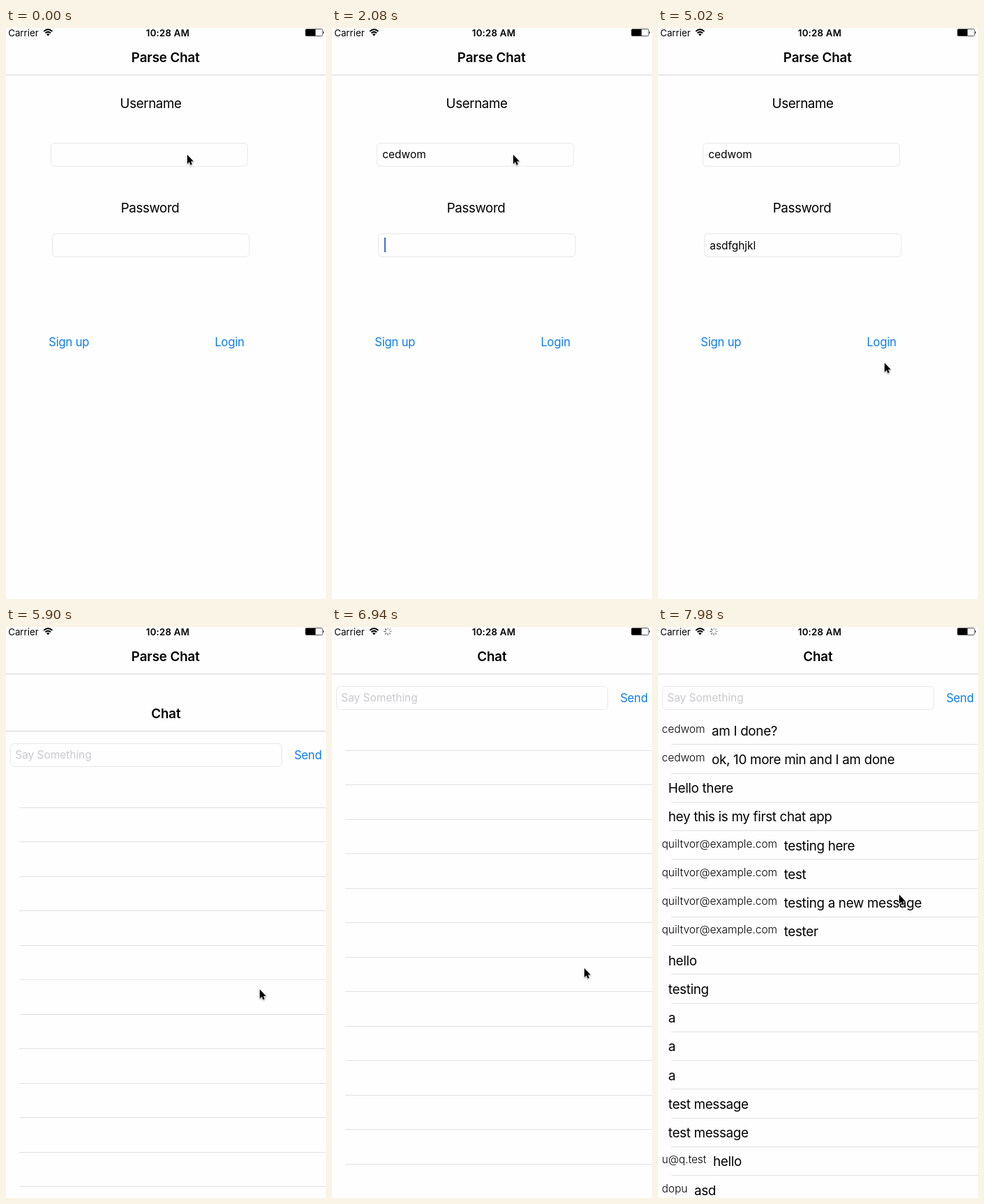
These frames come from a looping animation (459 by 820 pixels, 8 s). An HTML page:

```html
<!DOCTYPE html>
<html lang="en">
<head>
<meta charset="utf-8">
<title>Chat login</title>
<style>
  html, body { margin: 0; width: 100%; height: 100%; overflow: hidden; background: #fefefe; }
  svg { display: block; width: 459px; height: 820px; }
  text { font: 18.85px Inter, Roboto, sans-serif; letter-spacing: -.45px; white-space: pre; }
  #list text { letter-spacing: -.33px; }
  .title { font-weight: 600; letter-spacing: -.15px; }
  .field { font-size: 15.5px; letter-spacing: -.05px; }
  .hint { fill: #c9c9ce; }
  .link { font-size: 16.6px; letter-spacing: -.17px; fill: #0a7cf6; }
  .status { font-size: 13.3px; letter-spacing: 0; }
  .clock { font-weight: 600; letter-spacing: .2px; }
  .who { font-size: 15.5px; font-weight: 300; letter-spacing: 0; }
  .box { fill: #fefefe; stroke: #e8e8e8; }
  .rule { stroke: #d3d3d3; }
  .row { stroke: #e0e0e0; }
</style>
</head>
<body>
<svg viewBox="0 0 459 820">
  <rect width="459" height="820" fill="#fefefe"/>

  <g id="login">
    <text class="title" x="179.8" y="49">Parse Chat</text>
    <path class="rule" d="M0 67.5H459"/>
    <text x="163.6" y="115">Username</text>
    <rect class="box" x="64.5" y="165.5" width="282" height="33" rx="5"/>
    <text class="field" id="user" x="72.3" y="187"></text>
    <text x="164.7" y="264.7">Password</text>
    <rect class="box" x="66.5" y="295.5" width="282.5" height="33" rx="5"/>
    <text class="field" id="pass" x="74.3" y="317.5"></text>
    <rect id="caret" width="2" height="21" fill="#4468dd"/>
    <text class="link" x="61.2" y="457">Sign up</text>
    <text class="link" id="go" x="299.4" y="457">Login</text>
  </g>

  <g id="sheet">
    <rect width="459" height="820" fill="#fefefe"/>
    <text class="title" x="208.2" y="49">Chat</text>
    <path class="rule" d="M0 67.5H459"/>
    <rect class="box" x="6.5" y="85.5" width="389" height="33" rx="5"/>
    <text class="field hint" x="13.3" y="107.4">Say Something</text>
    <text class="link" x="413.4" y="108">Send</text>
    <g id="blank"></g>
    <g id="list"></g>
  </g>

  <g id="bar">
    <text class="status" x="3.2" y="11.5">Carrier</text>
    <text class="status clock" x="232" y="11.5" text-anchor="middle">10:28 AM</text>
    <g fill="none" stroke="#000" stroke-width="2">
      <path d="M54.2 4.9Q60.3 -.9 66.4 4.9M56.5 7.3Q60.3 3.9 64.1 7.3"/>
    </g>
    <path d="M58 8.9Q60.3 7 62.6 8.9L60.3 11.4Z"/>
    <rect x="429.5" y="1.5" width="24.5" height="10" rx="1.5" fill="#fefefe" stroke="#555"/>
    <path d="M430 2H444V11H430ZM455 4.5Q457 6.5 455 8.5Z"/>
    <g id="spin" transform="translate(80 6.5)" stroke="#000" stroke-width="1.2"></g>
  </g>

  <path id="mouse" d="M0 0V13L3 10.3L4.8 14.7L6.9 13.8L5.1 9.4H9Z" stroke="#fff" paint-order="stroke"
    style="filter:drop-shadow(0 1px 1px #0006)"/>
</svg>

<script>
const $ = id => document.getElementById(id);
const LOOP = 8000, STEP = 147.6;
const NAME = "cedwom", SECRET = "asdfghjkl", MAIL = "quiltvor@example.com";

const messages = [
  [NAME, "am I done?"], [NAME, "ok, 10 more min and I am done"],
  ["", "Hello there"], ["", "hey this is my first chat app"],
  [MAIL, "testing here"], [MAIL, "test"], [MAIL, "testing a new message"], [MAIL, "tester"],
  ["", "hello"], ["", "testing"], ["", "a"], ["", "a"], ["", "a"],
  ["", "test message"], ["", "test message"], ["u@q.test", "hello"], ["dopu", "asd"]
];

// [time, value] pairs: the value holds until the next time
const userTyped = [[0, 0], [590, 2], [890, 3], [1030, 4], [1180, 6]];
const passTyped = [[0, 0], [2830, 1], [2980, 2], [3120, 3], [3420, 4], [3560, 5],
  [3860, 6], [4010, 7], [4150, 8], [4300, 9]];
const caretAlpha = [[0, 0], [150, .5], [300, 1], [1780, 0], [1930, .5], [2080, 1],
  [2680, .5], [2830, 1], [4590, .5], [4740, 0], [5320, 1]];

// [step, x, y] of the pointer tip
const path = [[30, 260, 182], [34, 325, 481], [36, 327, 450], [38, 329, 452],
  [40, 364, 520.5], [43, 362.5, 495], [47, 362, 490], [50, 362, 490], [54, 346, 384.5]];

const line = y => `<path class="row" d="M19 ${Math.floor(y) + .5}H459"/>`;
$("blank").innerHTML = Array.from({ length: 13 }, (_, i) => line(177 + 49.5 * i)).join("");
$("list").innerHTML = messages.map(([who, text], i) => {
  const y = 41.26 * i;
  const label = who && `<tspan class="who">${who}</tspan>`;
  return `<text x="${who ? 5.5 : 14.8}" y="${151.5 + y}">${label}` +
    `<tspan dx="${who ? 9.5 : 0}" dy="4">${text}</tspan></text>` + line(168.75 + y);
}).join("");
$("spin").innerHTML = Array.from({ length: 8 }, (_, i) =>
  `<path d="M0 -2.6V-5.6" transform="rotate(${45 * i})"/>`).join("");

const held = (list, t) => list.filter(e => e[0] <= t).pop()[1];
const show = (id, on) => $(id).setAttribute("visibility", on ? "inherit" : "hidden");
const move = (id, x, y) => $(id).setAttribute("transform", `translate(${x} ${y})`);

function pointer(k) {
  const i = path.findIndex(p => p[0] >= k);
  if (i < 1) return path[0].slice(1);
  const [a, b] = [path[i - 1], path[i]];
  const u = (k - a[0]) / (b[0] - a[0]), e = u * u * (3 - 2 * u);
  return [1, 2].map(n => a[n] + (b[n] - a[n]) * e);
}

function draw(t) {
  const k = Math.min(54, Math.floor((t + 10) / STEP));

  $("user").textContent = NAME.slice(0, held(userTyped, t));
  $("pass").textContent = SECRET.slice(0, held(passTyped, t));
  const inPass = t >= 1930;
  const field = $(inPass ? "pass" : "user");
  const width = field.textContent ? field.getComputedTextLength() : 0;
  $("caret").setAttribute("x", Math.round(width + (inPass ? 74.6 : 72.6)));
  $("caret").setAttribute("y", inPass ? 301 : 170.5);
  $("caret").setAttribute("opacity", held(caretAlpha, t));
  $("go").setAttribute("opacity", t >= 5320 && t < 5460 ? .3 : 1);

  const drop = Math.round(82 * Math.exp(1.4 * (40 - k)));
  show("sheet", drop < 820);
  move("sheet", 0, Math.min(drop, 820));
  show("blank", t < 7080);
  show("list", t >= 7080);

  show("spin", t >= 5320 && t < 5750 || t >= 6795);
  const head = Math.floor(k * STEP / 125);
  [...$("spin").children].forEach((s, i) =>
    s.setAttribute("opacity", .75 - .065 * ((head - i + 800) % 8)));

  move("mouse", ...pointer(k));
}

function tick() {
  draw(performance.now() % LOOP);
  requestAnimationFrame(tick);
}
tick();
</script>
</body>
</html>
```
